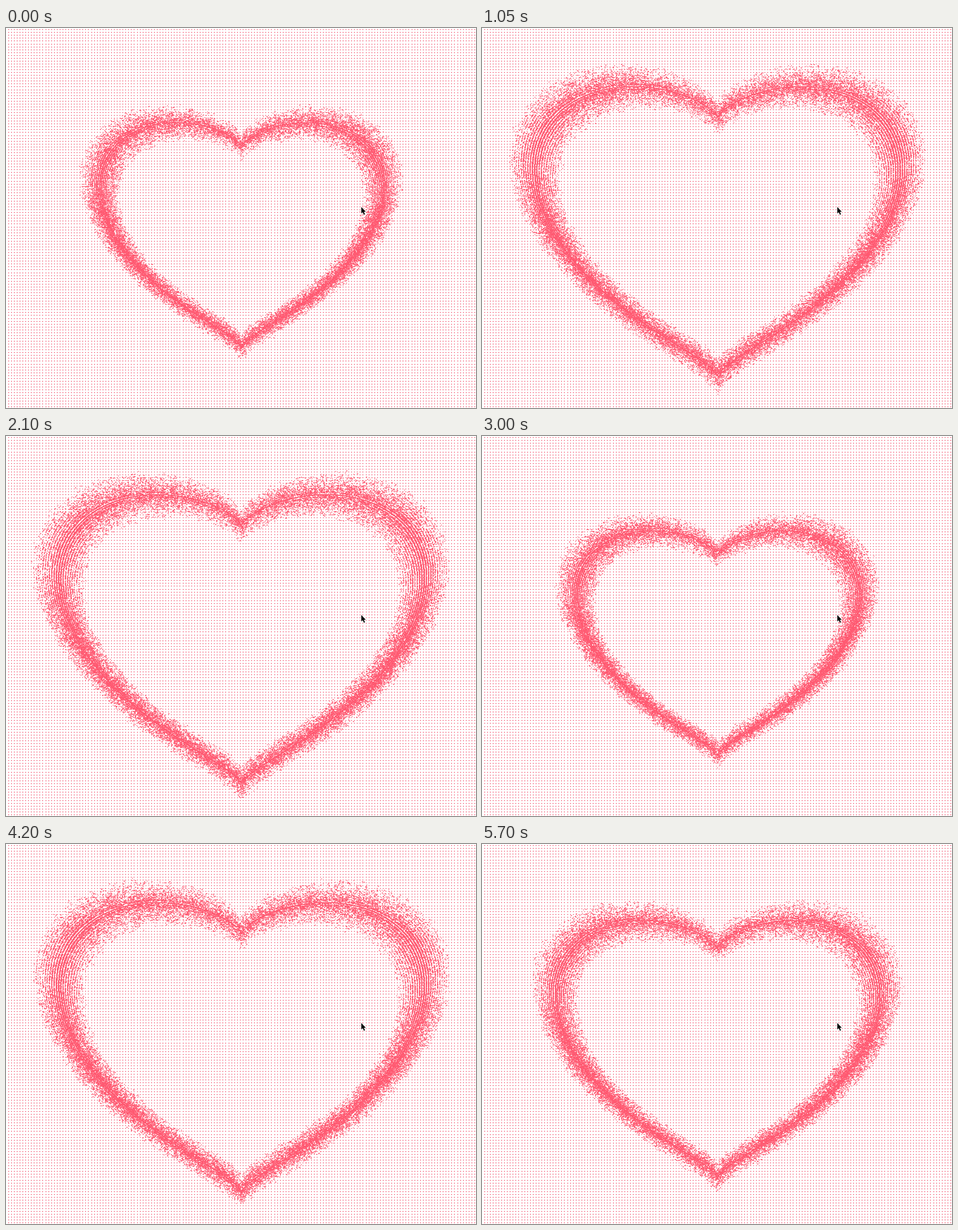
Recreate the animation shown at these times as an HTML page with a canvas. Size 832 px wide and 673 px high, loop 6150 ms.

```html
<!DOCTYPE html>
<html lang="en">
<head>
<meta charset="utf-8">
<title>Beating heart</title>
<style>
  html, body { margin: 0; height: 100%; overflow: hidden; background: #fff; }
  canvas { display: block; }
</style>
</head>
<body>
<canvas id="stage" width="832" height="673"></canvas>
<script>
const W = 832, H = 673, LOOP = 6150;
const PITCH = 5.0625, DOT = 1.4;        // background grid, dot side
const CX = 416.5, CY = 388.5;           // centre of the heart
const LEVELS = 12, SPREAD = 0.148;      // nested outlines around the main one
const STARTS = [0, 600, 1050, 1650, 2100, 2550, 3000, 3600, 4200, 4650, 5100, 5700];
const BEAT = [0, 1, 2, 3, 2, 1];        // size step, played twice per loop
const ctx = document.getElementById('stage').getContext('2d');

function seeded(seed) {
  return () => {
    seed = (seed + 0x6D2B79F5) | 0;
    let n = Math.imul(seed ^ (seed >>> 15), seed | 1);
    n ^= n + Math.imul(n ^ (n >>> 7), n | 61);
    return ((n ^ (n >>> 14)) >>> 0) / 4294967296;
  };
}

function dot(x, y, width = DOT) {
  ctx.fillRect(Math.round(x), Math.round(y), width, DOT);
}

function drawGrid() {
  ctx.fillStyle = '#fff';
  ctx.fillRect(0, 0, W, H);
  ctx.fillStyle = '#f0405e';
  for (let y = 2.2; y < H; y += PITCH)
    for (let x = 3.7; x < W; x += PITCH) dot(x, y);
}

function drawHeart(size, rand) {
  const a = 251 + 36.3 * size, b = a / Math.SQRT2;
  const count = 30000 + 7000 * size;
  ctx.fillStyle = '#ff5a72';
  for (let i = 0; i < count; i++) {
    const turn = rand() * 2 * Math.PI;
    // slightly denser at the sides and below
    const t = turn + 0.12 * Math.sin(turn) + 0.06 * Math.sin(2 * turn);
    const level = Math.round(LEVELS * rand() * rand());
    const k = 1 + (rand() < 0.5 ? -1 : 1) * SPREAD * level / LEVELS;
    const shake = level ? (rand() - 0.5) * 4 : 0;
    const x = CX + k * a * Math.sin(t);
    const y = CY - k * b * (Math.cos(t) + 0.6 * Math.abs(Math.sin(t)) ** (2 / 3)) + shake;
    dot(x - DOT / 2, y - DOT / 2, rand() < 0.35 ? DOT + 1 : DOT);
  }
}

function drawCursor() {
  const arrow = new Path2D('M629 317v11.5l2.6-2.3 2 4.6 1.9-.8-2-4.5h3.4z');
  ctx.strokeStyle = '#fff';
  ctx.lineWidth = 1.4;
  ctx.stroke(arrow);
  ctx.fillStyle = '#000';
  ctx.fill(arrow);
}

let shown = -1;
function frame(now) {
  const time = now % LOOP;
  const step = STARTS.filter(s => s <= time).length - 1;
  if (step !== shown) {
    shown = step;
    drawGrid();
    drawHeart(BEAT[step % BEAT.length], seeded(step * 977 + 5));
    drawCursor();
  }
  requestAnimationFrame(() => frame(performance.now() - begin));
}
const begin = performance.now();
frame(0);
</script>
</body>
</html>
```
